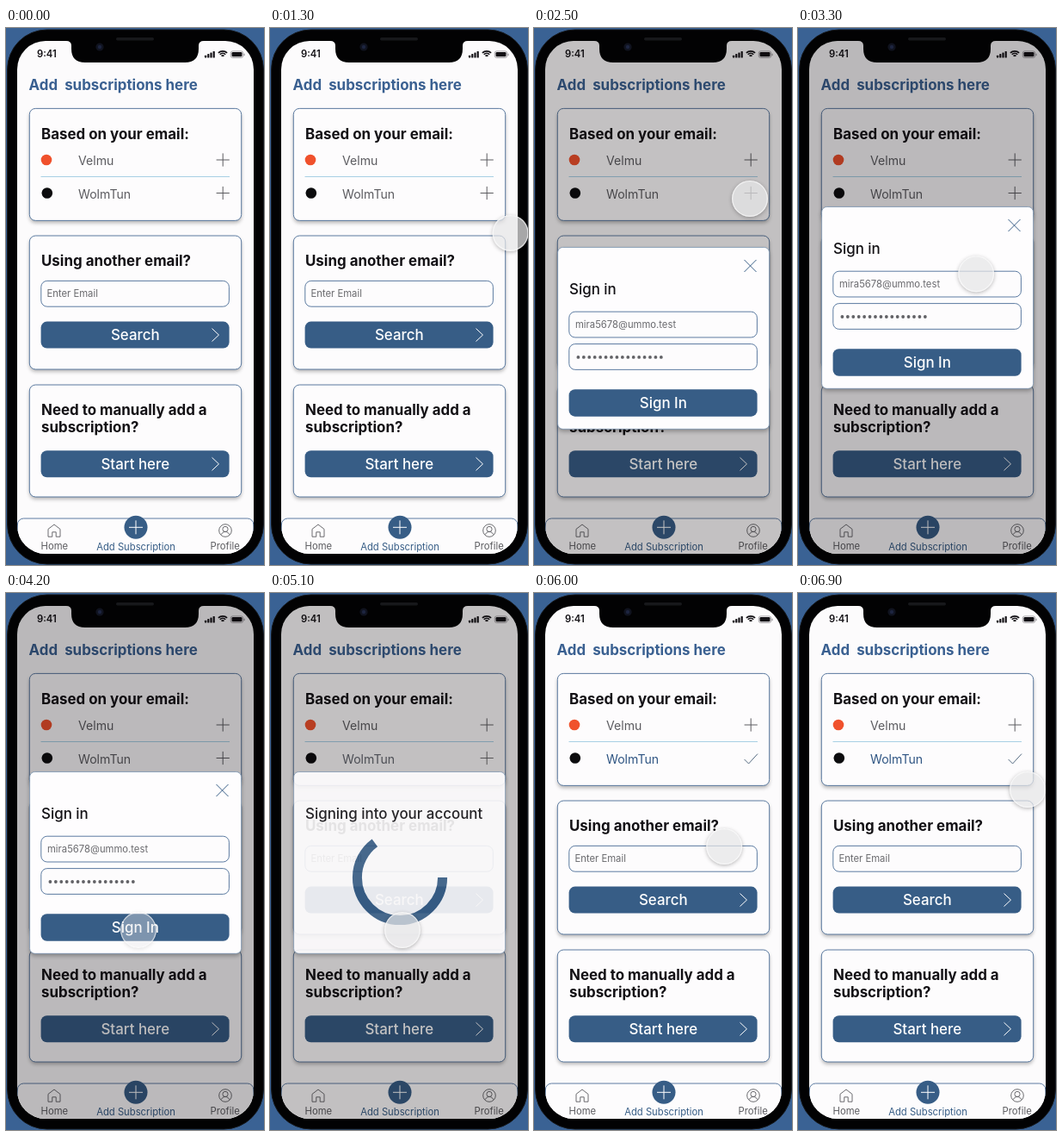
Write an HTML page with a canvas that moves like this. It is 300 by 623 pixels and loops after 7 s.

```html
<!DOCTYPE html>
<html lang="en">
<head>
<meta charset="utf-8">
<title>Add subscriptions</title>
<style>
  html, body { margin: 0; width: 100%; height: 100%; overflow: hidden; background: #3a6294; }
  canvas { display: block; width: 300px; height: 623px; }
</style>
</head>
<body>
<canvas id="stage"></canvas>
<script>
const W = 300, H = 623, LOOP = 7000;
const BLUE = '#375d86', INK = '#131115', GREY = '#5c5c60', PAPER = '#fdfcfd', BLACK = '#020203';
const BIG = 16.92, MID = 14.1, SMALL = 11.28;
const dpr = window.devicePixelRatio || 1;

function setup(canvas) {
  canvas.width = W * dpr;
  canvas.height = H * dpr;
  const c = canvas.getContext('2d');
  c.scale(dpr, dpr);
  return c;
}

const screen = setup(document.getElementById('stage'));
const buffer = setup(document.createElement('canvas'));
let g = screen;

const clamp = v => Math.max(0, Math.min(1, v));
const span = (t, from, to) => clamp((t - from) / (to - from));
const easeOut = u => 1 - (1 - u) ** 3;
const easeInOut = u => u * u * (3 - 2 * u);
const mix = (a, b, u) => a + (b - a) * u;

function box(x, y, w, h, r, fill, stroke, lw = 0.9) {
  g.beginPath();
  g.roundRect(x, y, w, h, r);
  if (fill) { g.fillStyle = fill; g.fill(); }
  if (stroke) { g.strokeStyle = stroke; g.lineWidth = lw; g.stroke(); }
}

function disc(x, y, r, fill) {
  g.beginPath();
  g.arc(x, y, r, 0, 7);
  g.fillStyle = fill;
  g.fill();
}

function line(points, color, lw = 1) {
  g.beginPath();
  points.forEach(([x, y]) => g.lineTo(x, y));
  g.strokeStyle = color;
  g.lineWidth = lw;
  g.stroke();
}

function text(str, x, y, size, color, weight = 400, align = 'left') {
  g.font = `${weight} ${size}px Inter, sans-serif`;
  g.textAlign = align;
  g.fillStyle = color;
  g.fillText(str, x, y);
}

function shadow(draw, blur, dy, alpha) {
  g.save();
  g.shadowColor = `rgba(0,0,0,${alpha})`;
  g.shadowBlur = blur * dpr;
  g.shadowOffsetY = dy * dpr;
  draw();
  g.restore();
}

// Draws a group and blends it as one picture.
function layer(alpha, draw) {
  if (alpha <= 0) return;
  buffer.clearRect(0, 0, W, H);
  g = buffer;
  draw();
  g = screen;
  g.save();
  g.globalAlpha *= alpha;
  g.drawImage(buffer.canvas, 0, 0, W, H);
  g.restore();
}

function plus(x, y, arm, color, lw = 1) {
  line([[x - arm, y], [x + arm, y]], color, lw);
  line([[x, y - arm], [x, y + arm]], color, lw);
}

function card(y, h) {
  shadow(() => box(27.3, y, 246.4, h, 7, PAPER), 4, 2.8, 0.28);
  box(27.3, y, 246.4, h, 7, null, '#4a6c97');
}

function button(label, y, h, chevron) {
  box(40.6, y, 219, h, 7, BLUE);
  text(label, 150.3, y + h / 2 + 6.3, BIG, '#fff', 500, 'center');
  if (chevron) {
    const m = y + h / 2;
    line([[239.5, m - 7.5], [247.5, m], [239.5, m + 7.5]], '#fff');
  }
}

function field(y, h) {
  box(40.8, y, 218.6, h, 7, PAPER, '#4a6c97');
}

function heading(str, y, color = INK) {
  text(str, 41, y, BIG, color, 700);
}

function statusBar() {
  text('9:41', 36, 34.3, 11.3, INK, 600);
  for (let i = 0; i < 4; i++) {
    const h = 2.8 + i * 1.6;
    box(231 + i * 3.2, 34.5 - h, 2.2, h, 0.6, INK);
  }
  for (const r of [2, 4.6, 7.2]) {
    g.beginPath();
    g.arc(252, 34, r, -Math.PI * 0.75, -Math.PI * 0.25);
    g.strokeStyle = INK;
    g.lineWidth = 1.7;
    g.stroke();
  }
  box(261.3, 26.9, 14.4, 7.6, 2.2, null, '#88868a', 0.7);
  box(262.5, 28.1, 12, 5.2, 1.2, INK);
  box(276.5, 29.4, 1, 2.8, 0.5, '#88868a');
}

function navBar() {
  box(13.4, 569, 274.4, 60, 7, PAPER, '#4a6c97');
  line([[53.8, 590.2], [49, 590.2], [49, 581.4], [56, 576], [63, 581.4], [63, 590.2],
    [58.2, 590.2], [58.2, 584.8], [53.8, 584.8], [53.8, 590.2]], GREY, 0.9);
  text('Home', 56.3, 605, SMALL, GREY, 400, 'center');

  disc(151, 579.3, 13.5, BLUE);
  plus(151, 579.3, 8, '#fff');
  text('Add Subscription', 151, 606, SMALL, BLUE, 400, 'center');

  g.strokeStyle = GREY;
  g.lineWidth = 0.9;
  for (const [y, r, from, to] of [[583, 7.3, 0, 7], [581.4, 3.1, 0, 7], [589.4, 5, Math.PI * 1.12, Math.PI * 1.88]]) {
    g.beginPath();
    g.arc(255, y, r, from, to);
    g.stroke();
  }
  text('Profile', 254.6, 605, SMALL, GREY, 400, 'center');
}

function page(done, tick) {
  box(13, 13, 275, 598, 0, '#fcfbfc');
  statusBar();
  text('Add  subscriptions here', 26.6, 72, BIG, '#3a6091', 700);

  card(93.4, 130);
  heading('Based on your email:', 128.6);
  disc(47, 153, 6.3, '#f0512c');
  text('Velmu', 84, 158.8, MID, GREY);
  plus(252.2, 153, 7.6, GREY);
  line([[40.5, 172.5], [260, 172.5]], '#a8d0e4');
  disc(47.8, 191.5, 6.3, '#0c0c0e');
  g.save();
  g.globalAlpha = 1 - done;
  text('WolmTun', 84, 197.6, MID, GREY);
  plus(252.2, 191.5, 7.6, GREY);
  g.globalAlpha = done;
  text('WolmTun', 84, 197.6, MID, '#2f5583');
  g.globalAlpha = tick;
  line([[244.6, 193], [249.6, 198], [260, 186.6]], '#566b82');
  g.restore();

  card(241, 155);
  heading('Using another email?', 276);
  field(293.4, 29.8);
  text('Enter Email', 47.5, 312.2, SMALL, '#6a6a6e');
  button('Search', 340.6, 31, true);

  card(414, 130);
  heading('Need to manually add a', 448.5);
  heading('subscription?', 468.8);
  button('Start here', 490.3, 31, true);
  navBar();
}

function panel() {
  shadow(() => box(27.6, 207.5, 246, 210.8, 6, '#fefdfe'), 5, 2.8, 0.3);
  box(27.6, 207.5, 246, 210.8, 6, null, '#6d8cad', 0.7);
}

function signIn() {
  panel();
  line([[244.5, 222], [258.5, 236]], BLUE);
  line([[258.5, 222], [244.5, 236]], BLUE);
  text('Sign in', 41, 262, BIG, INK, 500);
  field(282.2, 29.8);
  text('mira5678@ummo.test', 48, 301, SMALL, '#6a6a6e');
  field(319.6, 29.8);
  for (let i = 0; i < 16; i++) disc(51.4 + i * 6.43, 335, 1.9, '#626266');
  button('Sign In', 372.3, 31.4);
}

function signingIn() {
  panel();
  text('Signing into your account', 41, 262, BIG, INK, 500);
  g.beginPath();
  g.arc(151, 330, 49.6, 0, Math.PI * 1.3);
  g.strokeStyle = BLUE;
  g.lineWidth = 11;
  g.stroke();
}

function dialog(t, fade) {
  const rise = easeOut(span(t, 2346, 2646));
  if (rise <= 0 || fade <= 0) return;
  g.fillStyle = `rgba(6,0,4,${0.265 * rise * fade})`;
  g.fillRect(0, 0, W, H);
  const swap = span(t, 4290, 4590);
  if (swap < 1) {
    g.save();
    g.translate(0, (H - 207) * (1 - rise));
    signIn();
    g.restore();
  }
  layer(swap * fade, signingIn);
}

function phoneBody() {
  g.fillStyle = '#3a6294';
  g.fillRect(0, 0, W, H);
  box(1.6, 2, 297.8, 620, 46, BLACK, '#15181c', 1);
}

function notch() {
  g.fillStyle = BLACK;
  g.beginPath();
  g.moveTo(70, 12);
  g.lineTo(70, 15);
  g.quadraticCurveTo(76, 15, 76, 20.5);
  g.lineTo(76, 24);
  g.quadraticCurveTo(76, 40, 92, 40);
  g.lineTo(208, 40);
  g.quadraticCurveTo(224, 40, 224, 24);
  g.lineTo(224, 20.5);
  g.quadraticCurveTo(224, 15, 230, 15);
  g.lineTo(230, 12);
  g.fill();
  disc(109, 22, 4.6, '#10131f');
  disc(109, 22, 2.2, '#1d2540');
  box(128, 11, 44, 3.4, 1.7, '#17181b');
}

// Each stop: time, x, y.
const route = [[900, 324, 300], [1600, 251, 198], [2950, 251, 198],
  [3700, 154, 391], [5550, 154, 391], [6350, 267, 228], [LOOP, 267, 228]];

function pointer(t) {
  if (t < route[0][0]) return;
  const i = Math.max(1, route.findIndex(stop => t < stop[0]));
  const [t0, x0, y0] = route[i - 1], [t1, x1, y1] = route[i];
  const u = easeInOut(span(t, t0, t1));
  const x = mix(x0, x1, u), y = mix(y0, y1, u);
  const press = span(t, 4000, 4150) * (1 - span(t, 4300, 4500));

  // The shadow stays outside the see-through disc.
  g.save();
  g.beginPath();
  g.rect(0, 0, W, H);
  g.arc(x, y, 21, 0, 7);
  g.clip('evenodd');
  shadow(() => disc(x, y, 20.5, '#000'), 5, 1.2, 0.32 * (1 - press * 0.6));
  g.restore();
  disc(x, y, 21, `rgba(231,230,232,${mix(0.72, 0.4, press)})`);
  g.beginPath();
  g.arc(x, y, 20.3, 0, 7);
  g.strokeStyle = 'rgba(255,255,255,.6)';
  g.lineWidth = 1.3;
  g.stroke();
}

function draw(t) {
  const done = span(t, 5075, 5325);
  phoneBody();
  g.save();
  g.beginPath();
  g.roundRect(13, 15, 275, 595, 33);
  g.clip();
  page(done, span(t, 5200, 5400));
  dialog(t, 1 - done);
  g.restore();
  notch();
  pointer(t);
}

const start = performance.now();
function tick() {
  draw((performance.now() - start) % LOOP);
  requestAnimationFrame(tick);
}
tick();
</script>
</body>
</html>
```
